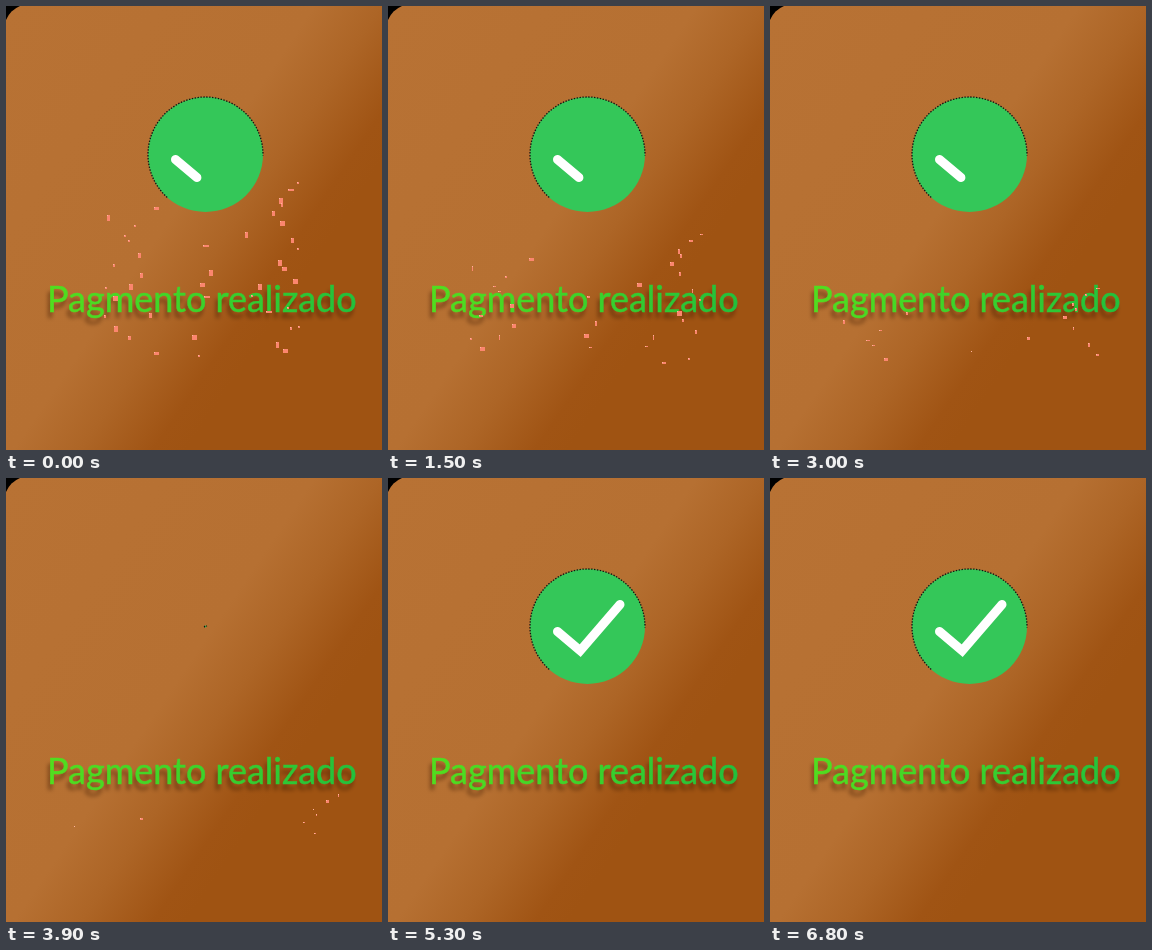
Animation, 376 px wide and 444 px high, one loop 6900 ms. Source, as an HTML page with a canvas:

```html
<!DOCTYPE html>
<html lang="pt">
<meta charset="utf-8">
<title>Pagmento realizado</title>
<style>
  html, body { margin: 0; height: 100%; overflow: hidden; background: #000; }
  canvas { display: block; }
</style>
<canvas id="stage" width="376" height="444"></canvas>
<script>
const ctx = document.getElementById('stage').getContext('2d');
const LOOP = 6900, STEP = 100, BEAT = 1500, BEAT_OFFSET = 600;
const CX = 199.5, CY = 148.5, RADIUS = 57.5;
const FLOOR = 356, BURST_X = 185;

const mix = (a, b, k) => a + (b - a) * k;
const clamp = k => Math.min(1, Math.max(0, k));
const smooth = k => k * k * (3 - 2 * k);
const random = n => Math.abs(Math.sin(n * 12.9898) * 43758.5453) % 1;

function gradient(x, y, ...stops) {
  const g = ctx.createLinearGradient(0, 0, x, y);
  stops.forEach(([at, color]) => g.addColorStop(at, color));
  return g;
}

const copper = gradient(330, 224,
  [0, '#b87234'], [.64, '#b67032'], [.78, '#ad6526'], [.93, '#a05414'], [1, '#9f5312']);
const lime = gradient(376, 0, [.1, '#52de1e'], [.5, '#3dd32a'], [.93, '#22c03c']);

// Three plumes: left, middle and the taller right one.
const plume = (count, x, width, top, seed) => Array.from({ length: count }, (_, i) => ({
  x: x + width * (random(seed + i) - .5),
  y: mix(top, 350, ((i + random(seed + i + 50)) / count) ** 1.1),
  spin: 6.28 * random(seed + i + 90)
}));
const confetti = [
  ...plume(16, 125, 55, 200, 1),
  ...plume(6, 195, 25, 236, 200),
  ...plume(20, 268, 62, 172, 400)
];

function drawBackground() {
  ctx.fillStyle = '#000';
  ctx.fillRect(0, 0, 376, 444);
  ctx.fillStyle = copper;
  ctx.beginPath();
  ctx.roundRect(-2, -2, 400, 470, [26, 0, 0, 0]);
  ctx.fill();
}

// Pops past full size, dips below it, then settles.
function badgeRadius(phase) {
  if (phase < 300) return mix(1, 65, smooth(phase / 300));
  if (phase < 400) return mix(65, 53.5, smooth((phase - 300) / 100));
  return mix(53.5, RADIUS, smooth(clamp((phase - 400) / 100)));
}

function drawCheck(progress) {
  ctx.strokeStyle = '#fff';
  ctx.lineWidth = 9;
  ctx.lineCap = 'round';
  ctx.setLineDash([progress * 91, 200]);
  ctx.beginPath();
  ctx.moveTo(169.5, 153.5);
  ctx.lineTo(192.2, 172.6);
  ctx.lineTo(232, 126.5);
  ctx.stroke();
}

function drawBadge(phase) {
  const r = badgeRadius(phase);
  ctx.save();
  ctx.fillStyle = '#34c759';
  ctx.beginPath();
  ctx.arc(CX, CY, r, 0, 7);
  ctx.fill();

  ctx.strokeStyle = '#111';
  ctx.lineWidth = 1.3;
  ctx.setLineDash([1.4, 1.5]);
  ctx.beginPath();
  ctx.arc(CX, CY, r, 2.3, 6.3);
  ctx.stroke();

  const progress = clamp((phase - 450) / 850) ** .68;
  if (progress > 0) drawCheck(progress);
  ctx.restore();
}

function drawLabel() {
  const label = ['Pagmento realizado', 41, 306];
  ctx.save();
  ctx.font = '36px Lato, sans-serif';
  ctx.fillStyle = ctx.strokeStyle = lime;
  ctx.lineWidth = .5;
  ctx.shadowColor = 'rgba(60,25,0,.55)';
  ctx.shadowOffsetX = -2;
  ctx.shadowOffsetY = 6;
  ctx.shadowBlur = 4;
  ctx.fillText(...label);
  ctx.shadowColor = 'transparent';
  ctx.strokeText(...label);
  ctx.restore();
}

function drawConfetti(s) {
  const spread = 1 + .15 * s - .013 * s * s;
  const fall = 33 * s + .7 * s * s;
  const size = 5.8 - .7 * s;
  for (const { x, y, spin } of confetti) {
    const top = Math.round(y + fall);
    if (top > FLOOR) continue;
    const left = Math.round(mix(BURST_X, x, spread));
    const w = Math.max(1, Math.round(size * (.65 + .35 * Math.sin(spin + s * 5))));
    const h = Math.max(1, Math.round(size * (.65 + .35 * Math.cos(spin * 2 + s * 4))));
    ctx.fillStyle = '#fb866e';
    ctx.fillRect(left, top, w, h);
    ctx.fillStyle = '#ffb49c';
    ctx.fillRect(left, top, 1, 1);
  }
}

function frame(now) {
  const t = Math.floor(now % LOOP / STEP) * STEP;
  drawBackground();
  drawBadge((t + BEAT_OFFSET) % BEAT);
  drawLabel();
  drawConfetti(t / 1000);
  requestAnimationFrame(frame);
}
requestAnimationFrame(frame);
</script>
</html>
```
